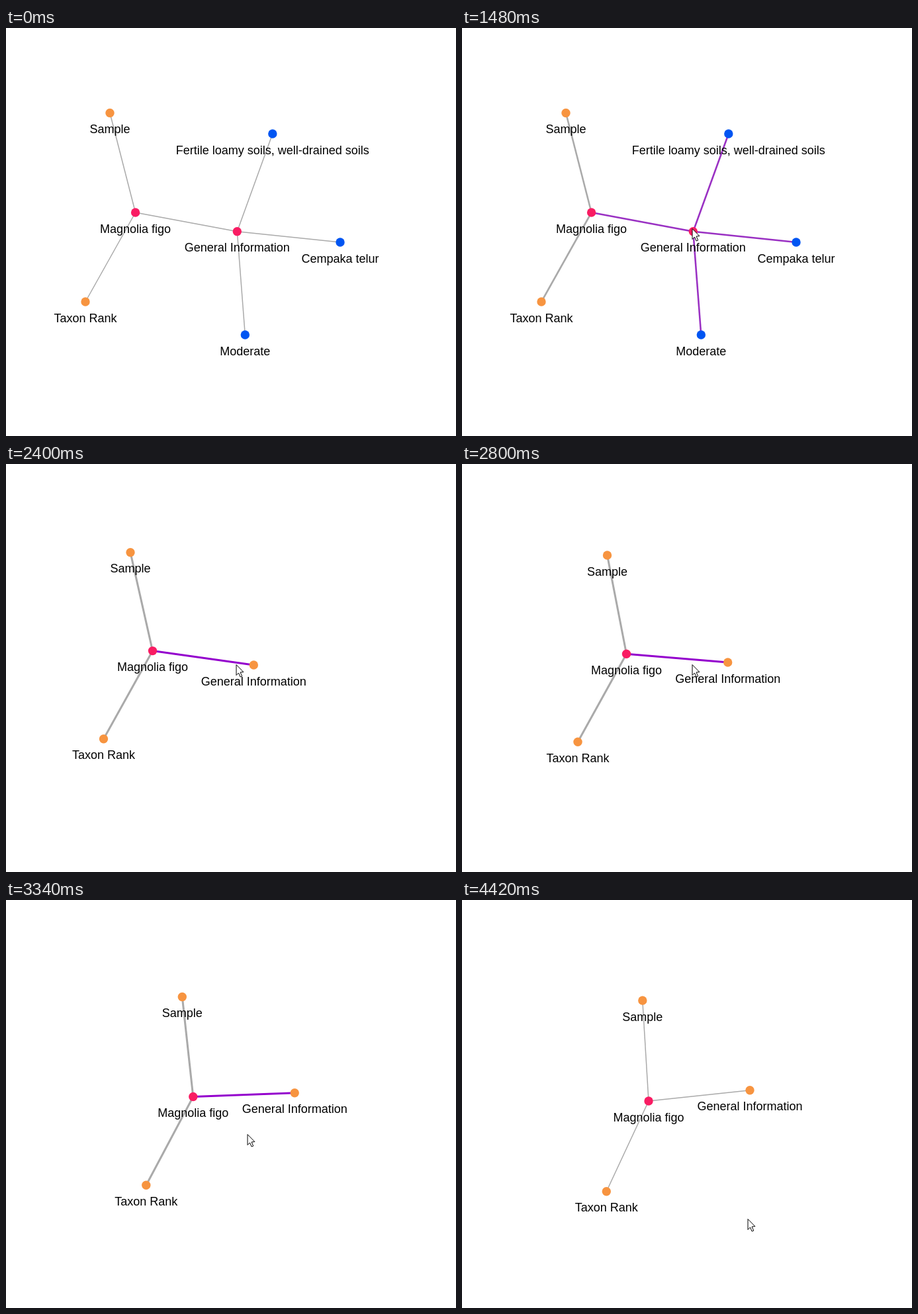
These frames come from a looping animation (680x617 px, 4.5 s). An HTML page with a canvas:

```html
<!DOCTYPE html>
<html lang="en">
<head>
<meta charset="utf-8">
<title>Collapsible graph</title>
<style>
  html, body { margin: 0; width: 100%; height: 100%; overflow: hidden; background: #fff; }
  canvas { display: block; }
</style>
</head>
<body>
<canvas id="stage" width="680" height="617"></canvas>
<script>
const ctx = document.getElementById('stage').getContext('2d');

// The picture advances in even ticks after a still opening.
const LOOP = 4500, OPENING = 315, TICK = 77.2;
const COLLAPSE = 25, HOVER_IN = 12, HOVER_OUT = 39;

const ORANGE = '#f79440', PINK = '#f91c63', BLUE = '#0055f2';
const GREY = [170, 170, 170], VIOLET = [148, 0, 205];

// Path points: [tick, x, y, ease-out power of the stretch leading here]
const nodes = {
  sample: { label: 'Sample', color: ORANGE, path: [
    [23, 157, 128.5], [24, 158, 130.5], [29, 208, 136], [31, 208, 136], [32, 219.5, 138],
    [39, 266.3, 146.5, 1.6], [45, 272.2, 149.7, 1.6], [53, 272.8, 152]] },
  taxon: { label: 'Taxon Rank', color: ORANGE, path: [
    [23, 120, 414], [24, 122, 412.5], [29, 164.5, 418], [31, 164.5, 418], [32, 175, 420.2],
    [39, 211.8, 431.2, 1.6], [45, 216.3, 436, 1.3], [53, 218.3, 440.7]] },
  magnolia: { label: 'Magnolia figo', color: PINK, path: [
    [23, 195.6, 279], [24, 196.8, 279], [29, 238, 285], [31, 238, 285], [32, 248.5, 287.2],
    [39, 282.8, 297.5, 1.6], [45, 284.7, 301.2, 1.3], [53, 282, 304]] },
  general: { label: 'General Information', color: PINK, path: [
    [24, 349.3, 307.8], [29, 391, 301.5], [31, 391, 301.5], [32, 401.7, 300],
    [39, 436.2, 291.7, 1.6], [45, 437.9, 289.3, 1.3], [53, 435, 287.7]] },
  soil: { label: 'Fertile loamy soils, well-drained soils', color: BLUE, leaf: true, path: [
    [23, 402.8, 160], [24, 401.9, 161.7]] },
  common: { label: 'Cempaka telur', color: BLUE, leaf: true, path: [
    [23, 505, 324], [24, 502.7, 323.8]] },
  water: { label: 'Moderate', color: BLUE, leaf: true, path: [
    [23, 361.3, 464], [24, 360.7, 462]] }
};

const links = [
  ['magnolia', 'sample'], ['magnolia', 'taxon'], ['magnolia', 'general'],
  ['general', 'soil'], ['general', 'common'], ['general', 'water']
];

const cursorPath = [
  [0, 571, 603], [6, 421, 427, 1.2], [12, 349, 305, 1.5], [13, 347.5, 303],
  [35, 347.5, 303], [39, 364.5, 354], [45, 393.5, 428], [53, 431.5, 482, 1.2]
];

const clamp = v => Math.min(1, Math.max(0, v));
const mix = (a, b, p) => a + (b - a) * p;
const easeOut = (p, power = 1) => 1 - (1 - p) ** power;

function along(path, tick) {
  const next = path.findIndex(point => point[0] > tick);
  if (next === 0) return path[0].slice(1, 3);
  if (next < 0) return path[path.length - 1].slice(1, 3);
  const [t0, x0, y0] = path[next - 1], [t1, x1, y1, power] = path[next];
  const p = easeOut((tick - t0) / (t1 - t0), power);
  return [mix(x0, x1, p), mix(y0, y1, p)];
}

function drawLink(from, to, width, color) {
  ctx.lineWidth = width;
  ctx.strokeStyle = color;
  ctx.beginPath();
  ctx.moveTo(...from);
  ctx.lineTo(...to);
  ctx.stroke();
}

function drawCursor([x, y]) {
  ctx.save();
  ctx.translate(x, y);
  ctx.beginPath();
  [[0.5, 0.5], [0.5, 16.5], [4, 13], [6.6, 19], [9.2, 18], [6.6, 12], [11.4, 11.6]]
    .forEach(point => ctx.lineTo(...point));
  ctx.closePath();
  ctx.fillStyle = '#fff';
  ctx.fill();
  ctx.lineWidth = 1;
  ctx.strokeStyle = '#000';
  ctx.stroke();
  ctx.restore();
}

function draw(time) {
  const tick = Math.floor((time - OPENING) / TICK);
  const collapsed = tick >= COLLAPSE;
  const visible = Object.keys(nodes).filter(id => !(collapsed && nodes[id].leaf));
  const at = {};
  visible.forEach(id => at[id] = along(nodes[id].path, tick));

  const hover = easeOut(clamp((tick - HOVER_IN) / 6.5), 2)
    * (1 - easeOut(clamp((tick - HOVER_OUT) / 6), 2));
  const violet = `rgb(${GREY.map((c, i) => Math.round(mix(c, VIOLET[i], hover)))})`;

  ctx.fillStyle = '#fff';
  ctx.fillRect(0, 0, 680, 617);

  for (const [a, b] of links) {
    if (!at[a] || !at[b]) continue;
    const active = a === 'general' || b === 'general';
    drawLink(at[a], at[b], mix(1.5, 3, hover), active ? violet : `rgb(${GREY})`);
  }

  for (const id of visible) {
    ctx.fillStyle = collapsed && id === 'general' ? ORANGE : nodes[id].color;
    ctx.beginPath();
    ctx.arc(...at[id], 6.7, 0, 2 * Math.PI);
    ctx.fill();
  }

  ctx.font = '18px "Liberation Sans", Arial, sans-serif';
  ctx.textAlign = 'center';
  ctx.fillStyle = '#000';
  for (const id of visible) {
    const [x, y] = at[id];
    ctx.fillText(nodes[id].label, x, y + 30.5);
  }

  if (tick >= 0) drawCursor(along(cursorPath, tick));
}

const start = performance.now();
function play() {
  draw((performance.now() - start) % LOOP);
  requestAnimationFrame(play);
}
play();
</script>
</body>
</html>
```
